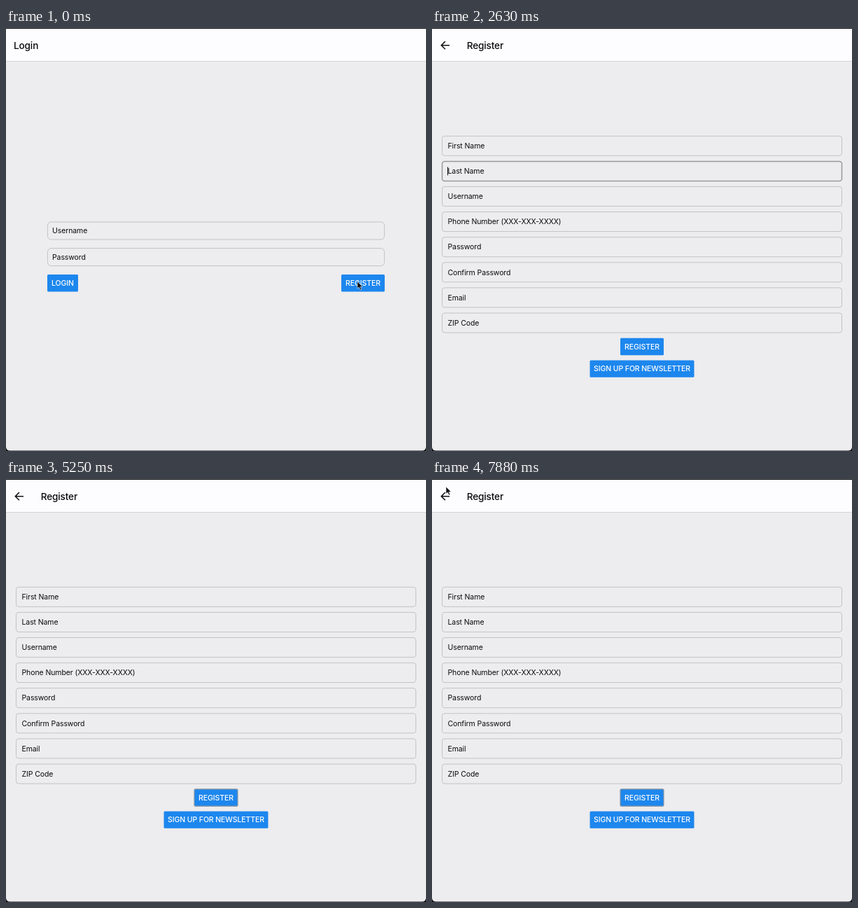
These frames come from a looping animation (600 by 604 pixels, 8 s). An HTML page:

```html
<!DOCTYPE html>
<html lang="en">
<head>
<meta charset="utf-8">
<title>Register form</title>
<style>
  html, body { margin: 0; width: 100%; height: 100%; overflow: hidden; background: #000; }
  svg { display: block; width: 100%; height: 100%; }
  text { font: 10.5px Inter, Roboto, sans-serif; letter-spacing: -.1px; fill: #0b0b0c; }
  .title { font-size: 13.6px; font-weight: 500; letter-spacing: -.15px; }
  .field { fill: none; stroke: #c3c2c5; stroke-width: 1; }
  .field.focus { stroke: #99999b; stroke-width: 1.5; }
  .button { fill: #1d87ee; }
  .button.focus { stroke: #8b95a0; stroke-width: 1.2; }
  .label { fill: #fff; font-weight: 500; text-anchor: middle; }
  .pointer { fill: #050505; stroke: #fff; stroke-width: .6; }
</style>
</head>
<body>
<svg viewBox="0 0 600 604">
  <path fill="#edecee" d="M0 1H600V598Q600 603.5 594 603.5H6Q0 603.5 0 598Z"/>
  <path fill="#fdfcfe" d="M0 1H600V47.5H0Z"/>
  <path stroke="#d6d5d8" d="M0 47.5H600"/>
  <g id="login"><text class="title" x="11" y="29.8">Login</text></g>
  <g id="register">
    <path d="M25 24.7H13.5M18.9 19.1L13.3 24.7L18.9 30.3" fill="none" stroke="#111" stroke-width="1.5"/>
    <text class="title" x="49.7" y="29.8">Register</text>
    <path id="caret" stroke="#111" d="M22.5 -6V6"/>
  </g>
  <g id="cursor">
    <path class="pointer" id="arrow" d="M0 0V10.2L2.4 8L4.1 11.9L5.8 11.2L4.2 7.4H7.3Z"/>
    <g id="beam" fill="none">
      <path stroke="#7fd0d0" stroke-width="2.6" d="M-3.4 -5.5H3.4M0 -5.5V5.5M-3.4 5.5H3.4"/>
      <path stroke="#10282a" stroke-width="1.2" d="M-3.4 -5.5Q0 -5.5 0 -4Q0 -5.5 3.4 -5.5M0 -4V4M-3.4 5.5Q0 5.5 0 4Q0 5.5 3.4 5.5"/>
    </g>
    <path class="pointer" id="hand" d="M-1 0Q0 -1 1 0L2 4Q3 3 4 4Q5 3.4 6 4.6Q7.3 4.2 7.4 6L7 9.5L6 12H0L-3.4 7.2Q-3.6 5.7 -2 6.3L0 7.7Z"/>
  </g>
</svg>
<script>
const LOOP = 8000, STEP = 125, SWITCH = 250, HIDE = 2375, SHOW = 5375;
const byId = id => document.getElementById(id);
const show = (el, on) => { el.style.display = on ? '' : 'none'; };

function add(parent, tag, attrs, text = '') {
  const el = document.createElementNS('http://www.w3.org/2000/svg', tag);
  for (const name in attrs) el.setAttribute(name, attrs[name]);
  el.textContent = text;
  return parent.appendChild(el);
}

function addField(parent, x, y, width, height, rx, text) {
  const rect = add(parent, 'rect', { class: 'field', x, y, width, height, rx });
  add(parent, 'text', { x: x + (rx > 4 ? 6.5 : 8), y: y + height / 2 + 3.7 }, text);
  return { rect, x, y, width, height, pointer: 'beam' };
}

function addButton(parent, x, y, width, text) {
  const height = 24.4;
  const rect = add(parent, 'rect', { class: 'button', x, y, width, height, rx: 1.5 });
  add(parent, 'text', { class: 'label', x: x + width / 2, y: y + 16 }, text);
  return { rect, x, y, width, height, pointer: 'hand' };
}

const login = byId('login'), register = byId('register');
['Username', 'Password'].forEach((name, i) => addField(login, 59.5, 277 + i * 37.6, 481, 25, 5, name));
addButton(login, 59, 352, 44, 'LOGIN');
addButton(login, 479, 352, 62, 'REGISTER');

const controls = ['First Name', 'Last Name', 'Username', 'Phone Number (XXX-XXX-XXXX)',
  'Password', 'Confirm Password', 'Email', 'ZIP Code']
  .map((name, i) => addField(register, 14.5, 154.3 + i * 36.1, 571, 28, 3.5, name));
controls.push(addButton(register, 269, 442.8, 62, 'REGISTER'));
controls.push(addButton(register, 225.5, 474.4, 149, 'SIGN UP FOR NEWSLETTER'));

// When each control receives focus, in tab order
const focusTimes = [1250, 2375, 2750, 3125, 3375, 3750, 4125, 4500, 4875];
// Cursor hot spot: time, x, y
const path = [[0, 502, 362], [500, 502, 362], [1125, 259, 173], [SHOW, 259, 173], [5500, 259, 162],
  [6250, 302, 462], [6625, 302, 462], [7250, 146, 198], [7875, 20, 11], [LOOP, 20, 11]];

function cursorAt(time) {
  const i = path.findIndex(point => point[0] > time);
  const [t0, x0, y0] = path[i - 1], [t1, x1, y1] = path[i];
  const u = (time - t0) / (t1 - t0), ease = u * u * (3 - 2 * u);
  return [x0 + (x1 - x0) * ease, y0 + (y1 - y0) * ease];
}

function draw(time) {
  const registering = time >= SWITCH;
  show(login, !registering);
  show(register, registering);

  const focused = focusTimes.filter(t => t <= time).length - 1;
  controls.forEach((control, i) => control.rect.classList.toggle('focus', i === focused));
  const field = focused >= 0 && focused < 8 && controls[focused];
  show(byId('caret'), field && (time - focusTimes[focused]) % 1000 < 500);
  if (field) byId('caret').setAttribute('transform', `translate(0 ${field.y + field.height / 2})`);

  const [x, y] = cursorAt(time);
  const hovered = registering && controls.find(c =>
    x >= c.x && x <= c.x + c.width && y >= c.y && y <= c.y + c.height);
  const pointer = hovered ? hovered.pointer : 'arrow';
  for (const id of ['arrow', 'beam', 'hand']) show(byId(id), id === pointer);
  show(byId('cursor'), time < HIDE || time >= SHOW);
  byId('cursor').setAttribute('transform', `translate(${x} ${y})`);
}

const start = performance.now();
function tick() {
  const time = (performance.now() - start) % LOOP;
  draw(Math.floor(time / STEP) * STEP);
  requestAnimationFrame(tick);
}
tick();
</script>
</body>
</html>
```
